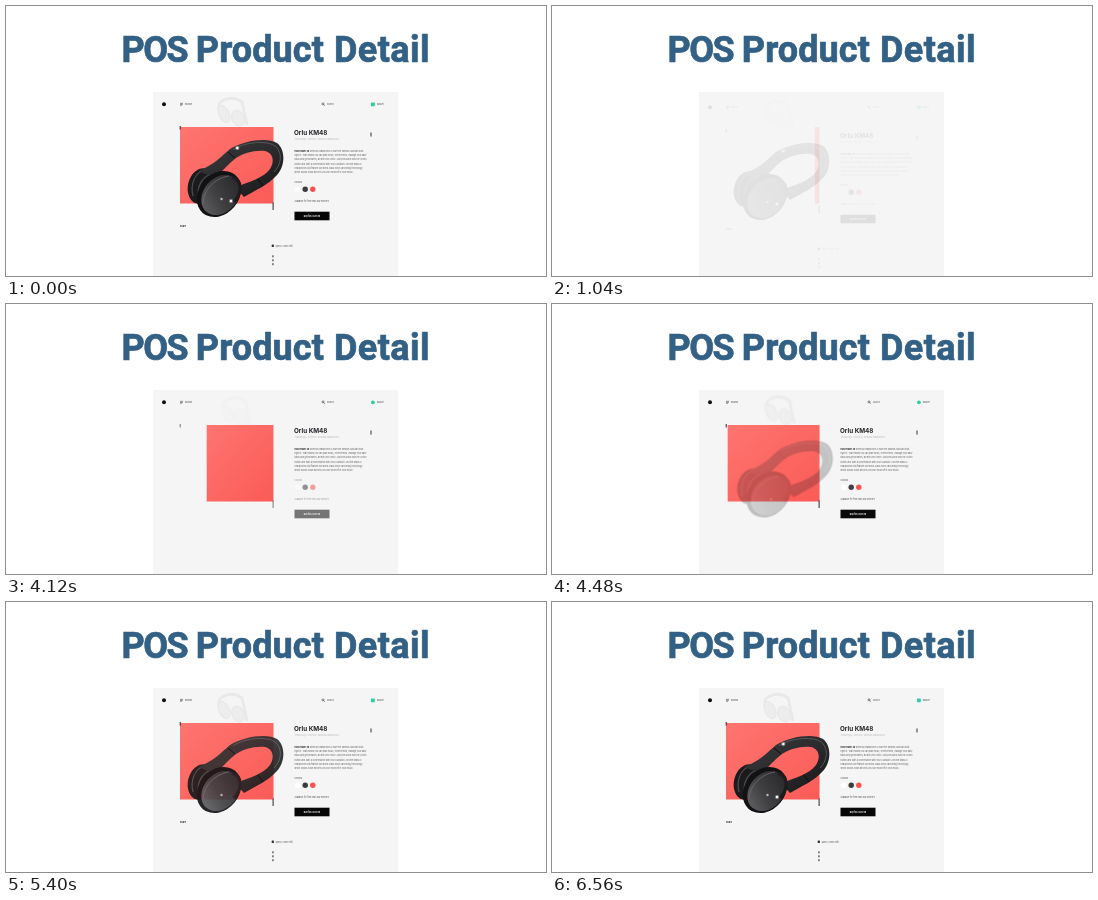
Animation of 540 by 270 pixels, one loop 6.6 s. Source, as an HTML page:

```html
<!DOCTYPE html>
<html lang="en">
<head>
<meta charset="utf-8">
<title>POS Product Detail</title>
<style>
  html, body { margin: 0; width: 100%; height: 100%; overflow: hidden; background: #fff; }
  svg { display: block; width: 100vw; height: 100vh; }
  text { font: 2.1px Inter, Roboto, sans-serif; fill: #444; white-space: pre; }
  .headline { font: 700 36px Roboto, Inter, sans-serif; fill: #336085; stroke: #336085; stroke-width: .7px; }
  .name { font-size: 6.3px; font-weight: 700; fill: #26262b; }
  .crumbs { fill: #b4b4b6; }
  .body { fill: #55555a; }
  .bold { font-weight: 700; fill: #222; }
  .buy { font-weight: 700; fill: #fff; text-anchor: middle; }

  .anim { animation: 6.6s linear infinite; }
  .scene { animation-name: scene; }
  .block { animation-name: block; transform-origin: 267.5px 0; }
  .head { animation-name: head; }
  .title { animation-name: title; }
  .copy { animation-name: copy; }
  .offer { animation-name: offer; }
  .marks { animation-name: marks; }
  .ghost { animation-name: ghost; }
  .phones { animation-name: phones; }
  .info { animation-name: info; }
  .dots { animation-name: dots; }
  .spots { animation-name: spots; }
  .basket { animation-name: basket; }

  /* everything leaves in five quick steps, then waits */
  @keyframes scene {
    0% { opacity: 1; transform: none; }
    12.73% { opacity: 1; transform: none; animation-timing-function: steps(5); }
    15.75%, 48.47% { opacity: .09; transform: translateY(3px); }
    48.48%, 100% { opacity: 1; transform: none; }
  }
  @keyframes block {
    0% { opacity: 1; transform: none; }
    12.73% { opacity: 1; transform: none; animation-timing-function: steps(5); }
    15.75%, 48.47% { opacity: .13; transform: scaleX(.05); }
    48.48%, 58.6% { opacity: 1; transform: scaleX(0); animation-timing-function: cubic-bezier(.2, .6, .35, 1); }
    70.5%, 100% { opacity: 1; transform: none; }
  }
  @keyframes head {
    0%, 48.47% { opacity: 1; transform: none; }
    48.48% { opacity: .25; transform: translateY(2px); animation-timing-function: ease-out; }
    55%, 100% { opacity: 1; transform: none; }
  }
  @keyframes title {
    0%, 48.47% { opacity: 1; transform: none; }
    48.48%, 49.5% { opacity: 0; transform: translateY(3px); animation-timing-function: ease-out; }
    58%, 100% { opacity: 1; transform: none; }
  }
  @keyframes copy {
    0%, 48.47% { opacity: 1; transform: none; }
    48.48%, 52% { opacity: 0; transform: translateY(3px); animation-timing-function: ease-out; }
    61%, 100% { opacity: 1; transform: none; }
  }
  @keyframes offer {
    0%, 48.47% { opacity: 1; }
    48.48%, 58.6% { opacity: 0; animation-timing-function: ease-out; }
    69%, 100% { opacity: 1; }
  }
  @keyframes marks {
    0%, 48.47% { opacity: 1; }
    48.48%, 58.6% { opacity: 0; }
    65%, 100% { opacity: 1; }
  }
  @keyframes ghost {
    0%, 48.47% { opacity: 1; transform: none; }
    48.48%, 59.5% { opacity: 0; transform: translate(5px, 2px); animation-timing-function: ease-out; }
    75%, 100% { opacity: 1; transform: none; }
  }
  @keyframes phones {
    0%, 48.47% { opacity: 1; transform: none; }
    48.48%, 62.5% { opacity: 0; transform: translate(5px, 3px); }
    67.88% { opacity: .24; transform: translate(3.5px, 2.4px); }
    74.55% { opacity: .76; transform: none; }
    81.82% { opacity: .92; transform: none; }
    89%, 100% { opacity: 1; transform: none; }
  }
  @keyframes info {
    0%, 48.47% { opacity: 1; }
    48.48%, 69% { opacity: 0; animation-timing-function: ease-out; }
    74.5%, 100% { opacity: 1; }
  }
  @keyframes dots {
    0%, 48.47% { opacity: 1; }
    48.48%, 75% { opacity: 0; }
    78.8%, 100% { opacity: 1; }
  }
  @keyframes spots {
    0%, 48.47% { opacity: 1; }
    48.48%, 81.5% { opacity: 0; }
    93%, 100% { opacity: 1; }
  }
  @keyframes basket {
    0%, 48.47% { rx: .6px; }
    48.48%, 68.5% { rx: 1.9px; }
    72%, 100% { rx: .6px; }
  }
</style>
</head>
<body>
<svg viewBox="0 0 540 270" preserveAspectRatio="none">
  <defs>
    <linearGradient id="coral" x1="0" y1="0" x2="1" y2="1">
      <stop offset="0" stop-color="#fe7570"/>
      <stop offset="1" stop-color="#fb5b57"/>
    </linearGradient>
    <linearGradient id="band" x1="0" y1="0" x2="1" y2="1">
      <stop offset="0" stop-color="#3a3a3c"/>
      <stop offset=".5" stop-color="#2c2c2e"/>
      <stop offset="1" stop-color="#161618"/>
    </linearGradient>
    <linearGradient id="face" x1=".7" y1="0" x2=".4" y2="1">
      <stop offset="0" stop-color="#29292b"/>
      <stop offset=".6" stop-color="#404043"/>
      <stop offset="1" stop-color="#5c5c5f"/>
    </linearGradient>
  </defs>

  <text class="headline" x="115.6" y="55.5" letter-spacing="-1.6">POS</text>
  <text class="headline" x="189.8" y="55.5" letter-spacing=".1">Product</text>
  <text class="headline" x="328" y="55.5" letter-spacing=".4">Detail</text>

  <rect x="147" y="86" width="245" height="184" fill="#f5f5f5"/>

  <g class="anim scene">
    <g class="anim ghost" fill="none" stroke="#e9e9ea">
      <path d="M213 103C211 93 226 89 236 96L241 119" stroke-width="3"/>
      <ellipse cx="218" cy="108" rx="5" ry="9" transform="rotate(-25 218 108)" fill="#ededee" stroke-width="1.5"/>
      <ellipse cx="232" cy="112" rx="6" ry="8" transform="rotate(-25 232 112)" fill="#ededee" stroke-width="1.5"/>
    </g>
  </g>

  <g class="anim block">
    <rect x="174" y="121" width="93.5" height="76.5" fill="url(#coral)"/>
  </g>

  <g class="anim scene">
    <g class="anim head">
      <circle cx="158" cy="98.2" r="2" fill="#111"/>
      <path d="M174 97.3h3M174 98.3h3M174 99.3h2" stroke="#333" stroke-width=".5"/>
      <text x="179" y="99">Browse</text>
      <circle cx="317" cy="97.9" r="1" fill="none" stroke="#333" stroke-width=".6"/>
      <path d="M317.7 98.6l1.1 1.1" stroke="#333" stroke-width=".6"/>
      <text x="321" y="99">Search</text>
      <rect class="anim basket" x="365" y="96.4" width="3.8" height="3.8" rx=".6" fill="#22d3a3"/>
      <text x="371" y="99">Basket</text>
    </g>

    <g class="anim marks" fill="#2a2a2d">
      <rect x="173.7" y="120" width="1" height="3.5"/>
      <rect x="266.6" y="196.5" width="1" height="7.5"/>
    </g>

    <g class="anim phones">
      <!-- far cup -->
      <ellipse cx="195" cy="180" rx="13" ry="18" transform="rotate(14 195 180)" fill="#1b1b1d"/>
      <path d="M187 190C184 178 189 167 198 164M193 193C190 181 196 171 205 168" fill="none" stroke="#4d4d50" stroke-width="1.2"/>
      <!-- headband -->
      <path d="M192 165C206 160 215 151 224 143C238 134 262 131 271 137C280 144 279 160 271 169C262 179 250 184 238 191L229 181C244 176 257 172 264 163C269 155 267 147 259 145C248 144 238 147 230 152C222 158 216 165 210 172Z" fill="url(#band)"/>
      <path d="M227 143.5C240 135.5 262 134 270 140.5C277 148 275 159 268 166" fill="none" stroke="#616164" stroke-width=".8"/>
      <path d="M222 146l7 6M252 173l5 7" stroke="#0c0c0d"/>
      <!-- near cup -->
      <ellipse cx="213" cy="188" rx="20" ry="25" transform="rotate(40 213 188)" fill="#121214"/>
      <ellipse cx="214.5" cy="189" rx="17" ry="22" transform="rotate(40 214.5 189)" fill="url(#face)"/>
      <path d="M197 198C197 184 209 172 223 170" fill="none" stroke="#6f6f72" stroke-width=".8"/>
      <path d="M226 171C237 174 236 187 228 196" fill="none" stroke="#1d1d1f" stroke-width="3"/>
      <circle cx="215.5" cy="193" r="1.2" fill="#b9b9bb"/>
    </g>

    <g class="anim spots" fill="#fff">
      <circle cx="231.3" cy="142" r="2.2" fill-opacity=".3"/>
      <circle cx="231.3" cy="142" r="1.2"/>
      <circle cx="225" cy="195" r="2.2" fill-opacity=".3"/>
      <circle cx="225" cy="195" r="1.2"/>
    </g>

    <g class="anim title">
      <text class="name" x="288" y="128.7">Orlu KM48</text>
      <text class="crumbs" x="288.5" y="133.7">Technology / Devices / Wireless headphones</text>
      <rect x="364.5" y="126.5" width="1" height="4" fill="#333"/>
    </g>

    <g class="anim copy">
      <text class="body" y="146.2"><tspan class="bold" x="288.5">HushTravel 48</tspan> wireless headphones II have the Mellow Assistant built-</text>
      <text class="body" x="288.5" y="150.3">right in. That means you can play music, receive texts, manage your daily</text>
      <text class="body" x="288.5" y="154.4">tasks and get answers, all with your voice. Just press and hold the Action</text>
      <text class="body" x="288.5" y="158.5">button and start a conversation with your Assistant. And the KM48 II</text>
      <text class="body" x="288.5" y="162.6">headphones still feature our world-class noise-cancelling technology,</text>
      <text class="body" x="288.5" y="166.7">which blocks noise and lets you lose yourself in your music.</text>
    </g>

    <g class="anim offer">
      <text x="288.5" y="177">Colours</text>
      <circle cx="291.7" cy="183.3" r="2.7" fill="#fff"/>
      <circle cx="299.2" cy="183.3" r="2.7" fill="#3b3b40"/>
      <circle cx="306.8" cy="183.3" r="2.7" fill="#f9514d"/>
      <text x="288.5" y="196.4">Available for free next-day delivery</text>
      <rect x="288.5" y="205.7" width="35" height="8.6" fill="#060606"/>
      <text class="buy" x="306" y="210.8">Buy for £329.99</text>
    </g>

    <g class="anim info">
      <text class="bold" x="174" y="220.6">Share</text>
      <rect x="265.7" y="238.5" width="2.2" height="2.6" rx=".5" fill="#333"/>
      <text x="269.5" y="240.7">Specs / more info</text>
    </g>

    <g class="anim dots" fill="#333">
      <rect x="266.4" y="249.3" width="1.1" height="2"/>
      <rect x="266.4" y="253.3" width="1.1" height="2"/>
      <rect x="266.4" y="257.2" width="1.1" height="2"/>
    </g>
  </g>
</svg>
</body>
</html>
```
